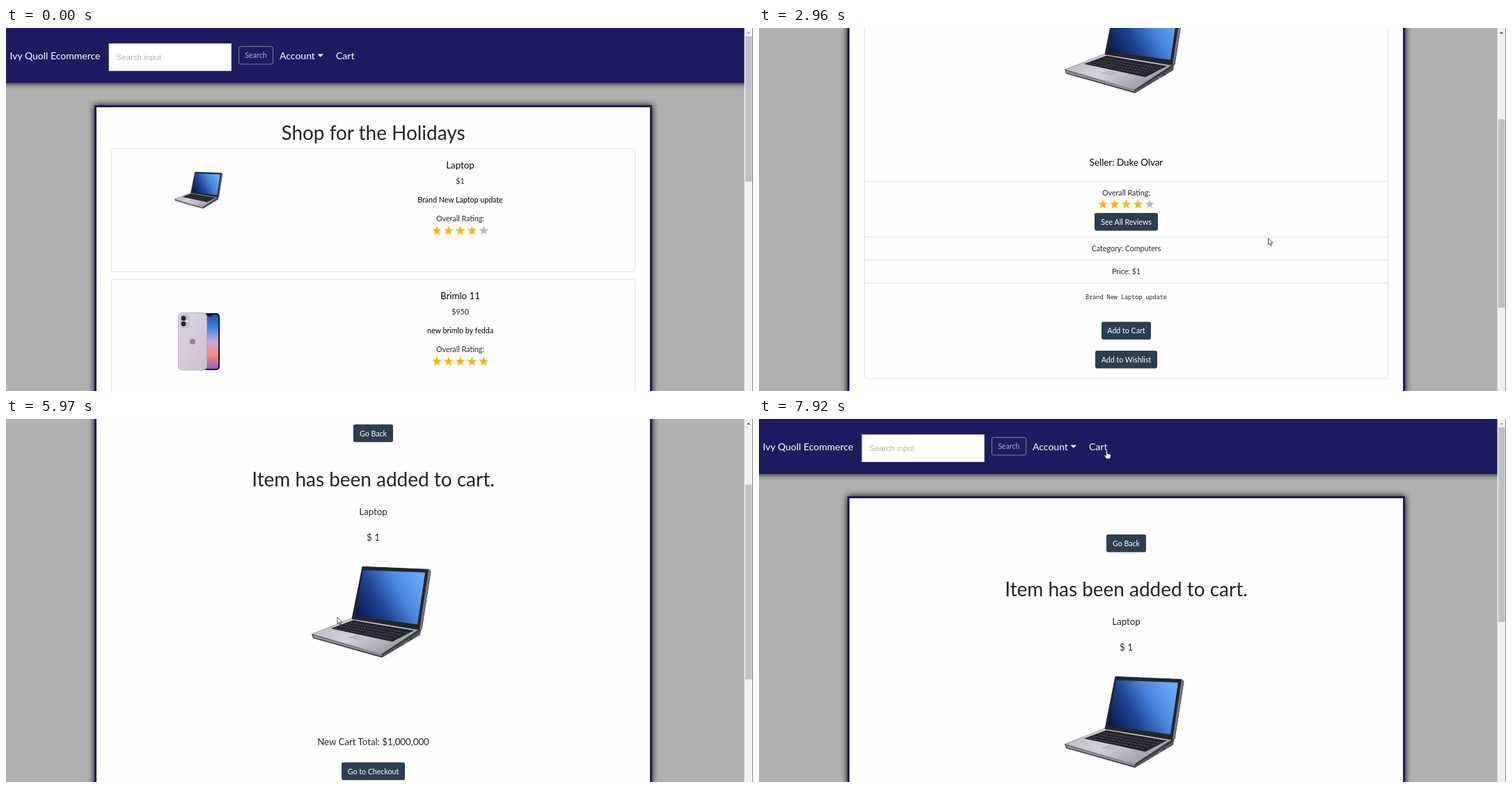
An HTML page that plays this animation: 1073x522 px, repeating every 7.99 s.

```html
<!DOCTYPE html>
<html lang="en">
<head>
<meta charset="utf-8">
<title>Shop demo</title>
<style>
html, body { margin: 0; width: 100%; height: 100%; overflow: hidden; background: #b0b0b0; }
svg { display: block; width: 100%; height: 100%; }
text { font-family: Lato, sans-serif; white-space: pre; }
.shadow { filter: drop-shadow(0 0 5px #000); }
.arial { font-family: "Liberation Sans", Arial, sans-serif; }
.mono { font-family: "Noto Sans Mono", monospace; }
</style>
</head>
<body>
<svg id="stage" viewBox="0 0 1073 522" preserveAspectRatio="none"></svg>
<script>
const DURATION = 7990, NAVY = '#1e1b60', INK = '#212529', SLATE = '#2c3e50';
const MID = 527.5, BODY = 10.65, LEAD = 13.35, TITLE = 27.95;

const text = (x, y, str, size = BODY, fill = INK, extra = 'text-anchor="middle"') =>
  `<text x="${x}" y="${y}" font-size="${size}" fill="${fill}" ${extra}>${str}</text>`;
const rect = (x, y, w, h, fill, extra = '') =>
  `<rect x="${x}" y="${y}" width="${w}" height="${h}" fill="${fill}" ${extra}/>`;
const poly = (points, fill, extra = '') => `<polygon points="${points}" fill="${fill}" ${extra}/>`;
const circle = (x, y, r, fill) => `<circle cx="${x}" cy="${y}" r="${r}" fill="${fill}"/>`;
const line = y => rect(152, y, 751, 1, '#dfdfdf');
const card = (y, h) => rect(151.5, y, 752, h, '#fefefe', 'rx="3" stroke="#e0e0e0"');
const button = (w, y, label, fill = SLATE, id = '') =>
  rect(MID - w / 2, y, w, 25.5, fill, `rx="2.8" ${id}`) + text(MID, y + 16.8, label, BODY, '#fff');

const starPoints = (cx, cy) => Array.from({length: 10}, (_, i) => {
  const r = i % 2 ? 2.9 : 7.3, a = i * Math.PI / 5;
  return `${(cx + r * Math.sin(a)).toFixed(2)},${(cy - r * Math.cos(a)).toFixed(2)}`;
}).join(' ');
const stars = (cx, cy, score) => [0, 1, 2, 3, 4].map(i =>
  poly(starPoints(cx + (i - 2) * 16.8, cy + .5), i < score ? '#ffb000' : '#bbbcbf')).join('');

function laptop(x, y, scale = 1) {
  const keys = [0, 1, 2, 3, 4].map(i =>
    `<path d="M${34 + i * 18} ${88 + i * 3.7}l28 -10" stroke="#15161a" stroke-width=".8"/>`).join('') +
    [0, 1, 2, 3].map(i => `<path d="M${55 - i * 7} ${80.5 + i * 2.6}l${84 - i} ${15}"
      stroke="#6c6e78" stroke-width=".7" stroke-dasharray="3 1.6"/>`).join('');
  return `<g transform="translate(${x} ${y}) scale(${scale})">` +
    poly('0,97 58,74 157,90 156,98 101,131 2,103', '#3b3c42') +
    poly('1,97 58,74 156,89 100,126', 'url(#metal)') +
    poly('1,98 100,126 101,129 3,102', '#8d8e96') +
    poly('28,89 60,77 147,92 116,108', '#25262c') + keys +
    poly('52,102 64,98 78,102 66,106', '#b9bac2') +
    poly('101,128 156,93 156,97 102,130', '#55565d') +
    circle(136, 109, 1.4, '#c98850') + circle(143, 104, 1.2, '#222') +
    poly('73,0 168,4 171,7 158,90 151,90 58,75', '#24252a', 'stroke="#24252a" stroke-linejoin="round"') +
    poly('168,4 171,7 158,90 155,90', '#77787e') +
    poly('74,5 163,8.5 152,83 63,71', 'url(#screen)') + '</g>';
}

const phone = () =>
  rect(272, 410, 35, 82, '#17171b', 'rx="5"') + rect(274, 412, 31, 78, 'url(#wallpaper)', 'rx="4"') +
  rect(282, 411, 15, 3.5, '#17171b', 'rx="1.5"') +
  rect(247.5, 409.5, 41, 82.5, 'url(#lilac)', 'rx="5.5" stroke="#aaa5b4" stroke-width=".8"') +
  rect(250, 412, 13.5, 20, '#c3bdcc', 'rx="4"') +
  circle(255, 417.5, 3.4, '#24222b') + circle(255, 425.5, 3.4, '#24222b') + circle(260.5, 421.5, 1.2, '#f7f5f2') +
  circle(268, 451, 4, '#8b8792');

const navbar = () =>
  rect(-20, -20, 1110, 99, NAVY, 'class="shadow"') +
  text(5.5, 45, 'Ivy Quoll Ecommerce', 14, '#fff', '') +
  rect(148, 22.5, 175.5, 39, '#fff', 'stroke="#ced4da" stroke-width=".8"') +
  text(158.5, 46, 'Search input', 11.5, '#b3b3b3', 'class="arial"') +
  rect(334.5, 26.5, 49, 25.5, 'none', 'rx="2.8" stroke="#95a0ab" stroke-width=".8"') +
  text(358.8, 43.2, 'Search', BODY, '#a9b2bb') +
  text(393, 45, 'Account', 14, '#fff', '') + poly('447.5,37.5 456,37.5 451.75,41.8', '#fff') +
  text(474, 45, 'Cart', 14, '#fff', '');

const page = (name, bottom, content) => `<g id="${name}">` + navbar() +
  rect(127, 111, 801, bottom - 111, NAVY, 'class="shadow"') + rect(130, 114, 795, bottom - 117, '#fefefe') +
  content +
  rect(-20, bottom + 33, 1110, 220, NAVY, 'class="shadow"') +
  text(MID, bottom + 47.5, '© 2020 Leopold Fennimark', BODY, '#fff', 'text-anchor="middle" font-weight="700"') + '</g>';

const listing = (y, name, price, about, score) => card(y, 177) +
  text(652.5, y + 28, name, LEAD, '#000') + text(652.5, y + 50.7, price) +
  text(652.5, y + 77.7, about, BODY, '#000') + text(652.5, y + 104.7, 'Overall Rating:') + stars(652.5, y + 117.5, score);

const home = page('home', 1200,
  text(MID, 161, 'Shop for the Holidays', TITLE) +
  listing(173.5, 'Laptop', '$1', 'Brand New Laptop update', 4) + laptop(242, 207, .403) +
  listing(361.5, 'Brimlo 11', '$950', 'new brimlo by fedda', 5) + phone());

const product = page('product', 836,
  card(134.5, 606.5) + text(MID, 177, 'Laptop', TITLE) + laptop(439, 199.5) +
  text(MID, 434.5, 'Seller: Duke Olvar', LEAD, '#000') + line(457) +
  text(MID, 478, 'Overall Rating:') + stars(MID, 490, 4) + button(91, 502.7, 'See All Reviews') + line(537) +
  text(MID, 557.7, 'Category: Computers') + line(570) +
  text(MID, 590.7, 'Price: $1') + line(603) +
  text(MID, 627.2, 'Brand New Laptop update', 8.48, INK, 'text-anchor="middle" class="mono"') +
  button(71, 659.2, 'Add to Cart', SLATE, 'id="add"') + button(89, 700.7, 'Add to Wishlist') +
  button(57, 772.5, 'Go Back'));

const cart = page('cart', 804,
  button(57, 166, 'Go Back') + text(MID, 255, 'Item has been added to cart.', TITLE) +
  text(MID, 295.7, 'Laptop', LEAD) + text(MID, 332.7, '$ 1', LEAD) +
  `<g id="picture">${laptop(439, 370.5)}</g>` +
  text(MID, 627.5, 'New Cart Total: $1,000,000', 13.25) +
  button(91, 652, 'Go to Checkout') + button(67, 693.3, 'Go to Cart') +
  button(103, 734.3, 'Remove from Cart', '#e74c3c'));

const gradient = (id, dir, ...colors) => `<linearGradient id="${id}" ${dir}>` + colors.map((c, i) =>
  `<stop offset="${i / (colors.length - 1)}" stop-color="${c}"/>`).join('') + '</linearGradient>';

const $ = id => document.getElementById(id);
$('stage').innerHTML = '<defs>' +
  gradient('screen', 'x1="0" y1=".75" x2="1" y2=".3"', '#081c50', '#1d4391', '#4a88de', '#6aa8f8') +
  gradient('metal', 'x1="0" y1="0" x2="1" y2=".6"', '#b4b5bd', '#d2d2d9', '#93949d') +
  gradient('lilac', 'x1="0" y1="0" x2="1" y2="1"', '#dcd7e3', '#c8c2d1') +
  gradient('wallpaper', 'x1="0" y1="0" x2="0" y2="1"', '#1c4fa8', '#3f86e0', '#c9a9dc', '#f08a78', '#9b58c8') +
  '</defs>' + rect(0, 0, 1073, 522, '#b0b0b0') + home + product + cart +
  rect(1060.5, 0, 12.5, 522, '#f1f1f1') + rect(1062, 12, 9.5, 100, '#c1c1c1', 'id="thumb"') +
  poly('1064,8 1069,8 1066.5,5', '#a3a3a3', 'id="up"') + rect(1072, 0, 1, 522, '#858585') +
  `<g id="pointer" stroke-linejoin="round">
    <path id="arrow" d="M0 0V9.6L2.2 7.6L3.7 11L5.1 10.4L3.6 7.1H6.6Z" fill="#fff" stroke="#222" stroke-width=".8"/>
    <path id="hand" d="M-1 1Q0 -.6 1 1V4.2L5 5.2Q6 5.6 5.8 7L5 11.5H-.6L-3.6 7.2Q-3.4 5.8 -1 7.2Z"
      fill="#fff" stroke="#333" stroke-width=".7"/></g>`;

// Each track is a list of [time, ...values].
const CURSOR = [
  [70, 1046, 512], [380, 1010, 368], [760, 1010, 368], [1480, 662, 205], [1600, 655, 196], [2100, 655, 196],
  [2400, 724, 301.5], [2500, 724, 301.5], [2900, 731.5, 302], [3050, 731.5, 302], [3680, 517, 391.5],
  [4620, 517, 391.5], [4700, 476, 285], [7360, 476, 285], [7720, 491, 36], [7900, 499.5, 45.5]];
const PRODUCT_SCROLL = [[2340, 0], [2420, 26], [2890, 232], [2960, 236.5], [3120, 281]];
const CART_SCROLL = [[5250, 0], [5450, 210], [5640, 0], [5730, 0], [6050, 210], [6280, 325], [6360, 349], [6750, 349], [7070, 0]];

const smooth = p => p * p * (3 - 2 * p);
function sample(track, t, ease = p => p) {
  const i = track.findIndex(key => key[0] > t);
  if (i === 0) return track[0].slice(1);
  if (i < 0) return track[track.length - 1].slice(1);
  const a = track[i - 1], b = track[i], p = ease((t - a[0]) / (b[0] - a[0]));
  return a.slice(1).map((v, k) => v + (b[k + 1] - v) * p);
}
const show = (id, on) => $(id).setAttribute('display', on ? 'inline' : 'none');

function draw(t) {
  const current = t < 2100 ? 'home' : t < 4620 ? 'product' : 'cart';
  const scroll = current === 'home' ? 0 : sample(current === 'product' ? PRODUCT_SCROLL : CART_SCROLL, t)[0];
  for (const name of ['home', 'product', 'cart']) show(name, name === current);
  $(current).setAttribute('transform', `translate(0 ${-scroll})`);
  show('picture', t >= 5000);

  const thumb = {home: 209, product: 271, cart: 280}[current];
  $('thumb').setAttribute('y', 12 + scroll * thumb / 538);
  $('thumb').setAttribute('height', thumb);
  $('up').setAttribute('fill', scroll > 0 ? '#505050' : '#a3a3a3');

  const add = $('add'), pressed = t >= 3840;
  add.setAttribute('fill', pressed ? '#1a252f' : t >= 3640 ? '#1e2b37' : SLATE);
  add.setAttribute('stroke', pressed ? '#8795a1' : 'none');
  add.setAttribute('stroke-width', 2);

  const [x, y] = sample(CURSOR, t, smooth);
  const overLink = t > 1540 && t < 2140 || t > 3640 && t < 4660 || t > 7660;
  show('pointer', t >= 70);
  show('hand', overLink);
  show('arrow', !overLink);
  $('pointer').setAttribute('transform', `translate(${x} ${y})`);
}

function tick() {
  draw(performance.now() % DURATION);
  requestAnimationFrame(tick);
}
tick();
</script>
</body>
</html>
```
